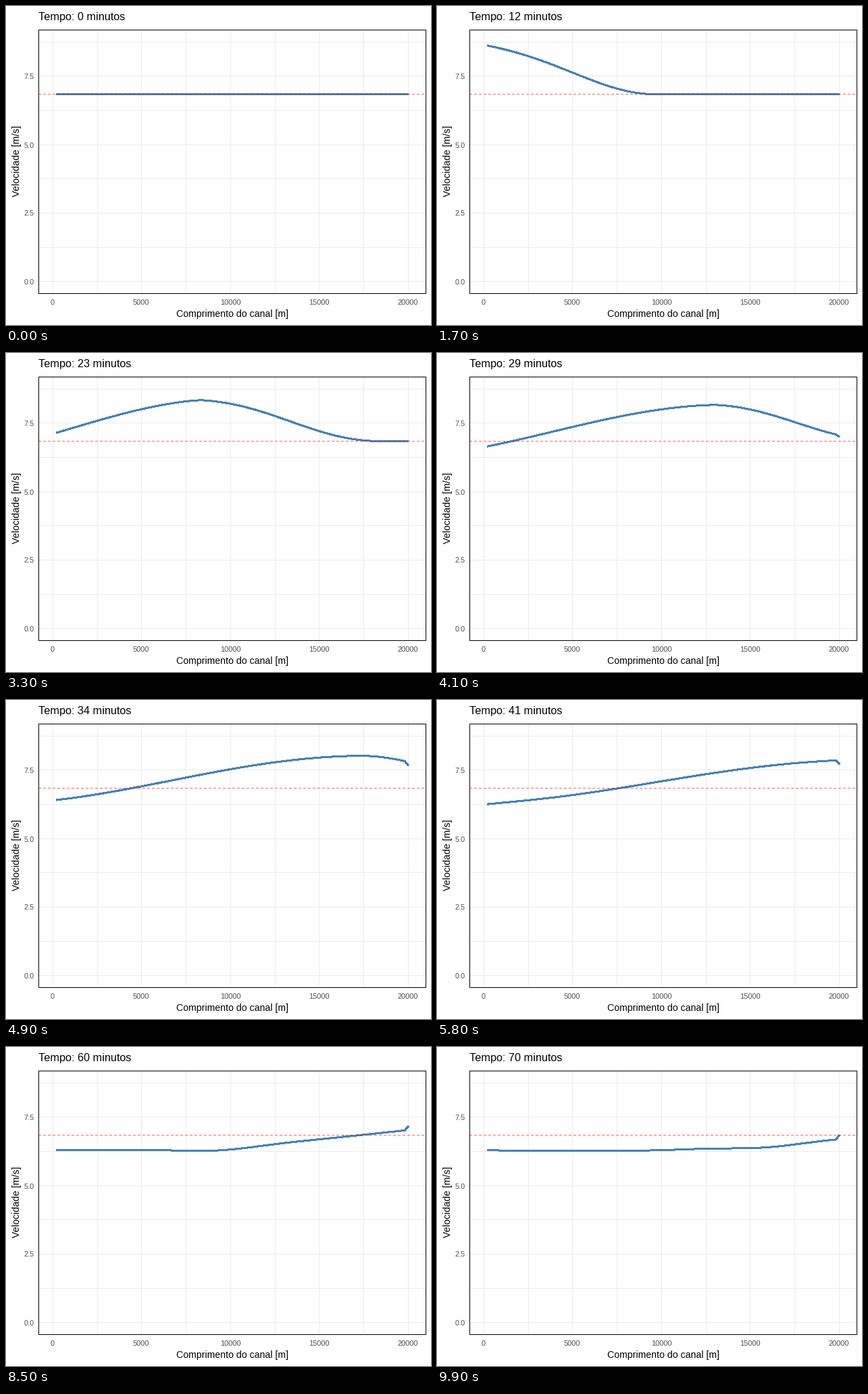
These frames come from a looping animation (629x472 px, 10 s). A matplotlib script:

```python
import numpy as np
import matplotlib.pyplot as plt
from matplotlib.animation import FuncAnimation
from matplotlib.patches import Rectangle

W, H, DPI = 629, 472, 100
PX = 72 / DPI                # points per pixel
FRAMES, INTERVAL = 100, 100
T_END = 69.67                # minutes covered by one loop
LENGTH = 20000               # channel length, m
CELERITY = 800               # wave speed, m/min
BASE, FLOOR = 6.838, 6.2     # velocity before and after the wave, m/s

LEFT, RIGHT, TOP, BOTTOM = 48, 621, 35, 425
GRID, TICK = "#EBEBEB", "#4D4D4D"

plt.rcParams["font.family"] = "Liberation Sans"


def velocity(x, t):
    """Flood wave that travels down the channel, flattening and widening."""
    d = x / 10000
    tau = t - x / CELERITY                       # time since the front passed
    amp = 2.54 / (1 + 0.225 * d)
    crest = 12.3 + 2.3 * np.exp(-2 * d)

    r = np.clip(tau / crest, 0, 1) ** (0.8 + 0.13 * d)
    rise = BASE + (FLOOR + amp - BASE) * np.sin(np.pi / 2 * r) ** 2
    s = np.maximum(tau - crest, 0) / (8.4 + 9.6 * d)
    fall = FLOOR + amp * np.exp(-s ** (1.1 + 0.15 * d))
    u = np.where(tau < crest, rise, fall)

    # shallow trough behind the wave, then a slight recovery near the inlet
    lag = tau - 45 - 3 * d
    k = np.clip((lag - 1) / 6, 0, 1)
    u -= 0.1 * np.exp(-(lag / 4) ** 2)
    u += 0.09 * k * k * (3 - 2 * k) * np.maximum(1 - d, 0)

    # the outlet node lags behind its neighbours
    u[-1] += 0.145 * np.tanh((t - 49.3) / 5) * np.clip((t - 25) / 10, 0, 1)
    return u


def to_x(m):
    return 69.3 + m * 0.02631


def to_y(v):
    return 407.7 - v * 40.53


fig = plt.figure(figsize=(W / DPI, H / DPI), dpi=DPI, facecolor="white")
ax = fig.add_axes([0, 0, 1, 1])
ax.set_xlim(0, W)
ax.set_ylim(H, 0)
ax.axis("off")


def rule(xs, ys, color, **kw):
    ax.plot(xs, ys, color=color, lw=PX, antialiased=False,
            solid_capstyle="butt", dash_capstyle="butt", **kw)


def label(x, y, text, size, color="black", **kw):
    return ax.text(x, y, text, fontsize=size * PX, color=color,
                   va="baseline", rotation_mode="anchor", **kw)


# Whole coordinates snap to the centre of that pixel
for m in range(0, LENGTH + 1, 2500):
    gx = int(to_x(m))
    rule([gx, gx], [TOP, BOTTOM], GRID, zorder=1)
    if m % 5000 == 0:
        label(gx, 442, str(m), 11, TICK, ha="center")
for v in np.arange(0, 9, 1.25):
    gy = int(to_y(v))
    rule([LEFT, RIGHT], [gy, gy], GRID, zorder=1)
    if v % 2.5 == 0:
        label(41.5, gy + 4.5, f"{v:.1f}", 11, TICK, ha="right")

xs = np.linspace(200, LENGTH, 100)
# without antialiasing a 2 px stroke fills three pixel rows
curve, = ax.plot([], [], color="steelblue", lw=2 * PX, antialiased=False,
                 snap=False, solid_capstyle="butt", zorder=2)
rule([LEFT, RIGHT], [130.5, 130.5], "red", alpha=.6, snap=False,
     linestyle=(0, (4, 4)), zorder=3)
ax.add_patch(Rectangle((LEFT, TOP), RIGHT - LEFT, BOTTOM - TOP, fill=False,
                       ec="black", lw=PX, antialiased=False, zorder=4))

title = label(47.5, 21, "", 16.2, ha="left")
label(334.6, 460, "Comprimento do canal [m]", 14.1, ha="center")
label(20, 229.5, "Velocidade [m/s]", 14.2, ha="center", rotation=90)


def update(i):
    t = T_END * i / (FRAMES - 1)
    curve.set_data(to_x(xs), to_y(velocity(xs, t)))
    title.set_text(f"Tempo: {round(t)} minutos")
    return curve, title


anim = FuncAnimation(fig, update, frames=FRAMES, interval=INTERVAL,
                     repeat=True, repeat_delay=0)
plt.show()
```
